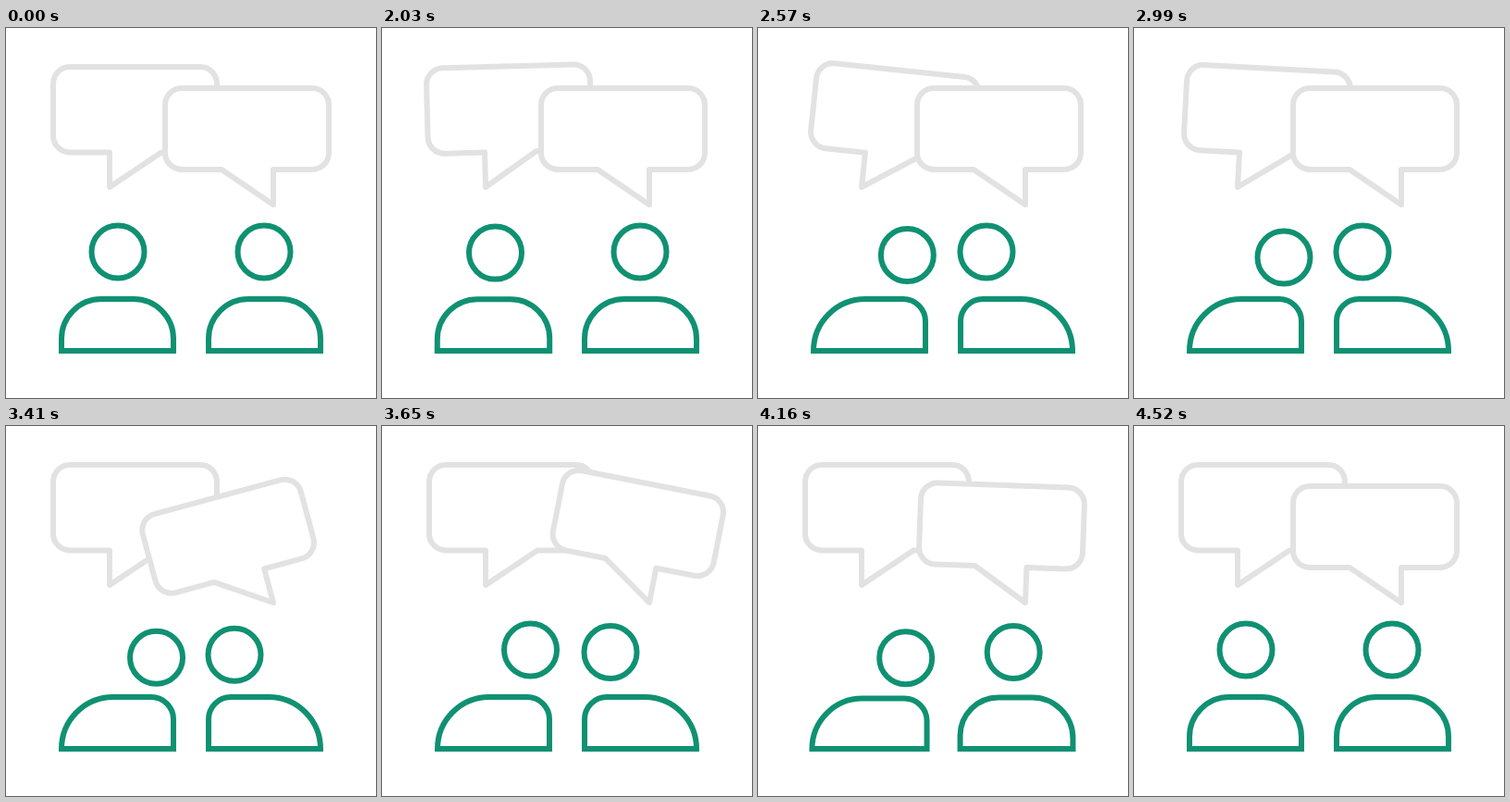
Write an HTML page with a canvas that moves like this. It is 400x400 px and loops after 4.55 s.

```html
<!DOCTYPE html>
<html lang="en">
<head>
<meta charset="utf-8">
<title>Conversation</title>
<style>
  html, body { margin: 0; width: 100%; height: 100%; overflow: hidden; background: #fff; }
  canvas { display: block; width: 400px; height: 400px; }
</style>
</head>
<body>
<canvas id="stage" width="400" height="400"></canvas>
<script>
const ctx = document.getElementById('stage').getContext('2d');
const LOOP = 4550, START = 2030, STEP = 30;
const TURN = 450, NOD = 389, BASE = 349, TOP = 293;
const GREY = '#e2e2e2', GREEN = '#0f9172';

// Damped swing in degrees, as [time, angle] keys
const SWING = [[0, 0], [240, -20.3], [485, 14.3], [720, -8.8], [950, 3.5], [1180, 0]];

const bubbles = [
  { x: 51, y: 42, w: 177, h: 92.5, tip: [112, 172], tailEnd: 168, start: 1990 },
  { x: 172, y: 65, w: 177, h: 88, tip: [289, 191], tailEnd: 233, start: 3110 }
];

const people = [
  { left: 60, right: 181, from: 121, to: 160.5, radii: [56, 24],
    turnIn: 1985, turnOut: 4060, nodAt: 2492, nods: 3, depth: 10, lean: 0.25 },
  { left: 219, right: 340, from: 279, to: 247, radii: [24, 56],
    turnIn: 2085, turnOut: 3780, nodAt: 3320, nods: 1, depth: 12, lean: 0 }
];

const clamp = v => Math.min(1, Math.max(0, v));
const mix = (a, b, p) => a + (b - a) * p;
const smooth = v => { const p = clamp(v); return p * p * (3 - 2 * p); };

function swing(t) {
  for (let i = 1; i < SWING.length; i++) {
    const [t0, a0] = SWING[i - 1], [t1, a1] = SWING[i];
    if (t < t1) return mix(a0, a1, smooth((t - t0) / (t1 - t0)));
  }
  return 0;
}

function drawBubble({ x, y, w, h, tip, tailEnd, start }, t) {
  const r = 18, right = x + w, bottom = y + h;
  const tail = [[tip[0], bottom], tip, [tailEnd, bottom]];
  if (tailEnd > tip[0]) tail.reverse();
  ctx.save();
  ctx.translate(...tip);
  ctx.rotate(swing(t - start) * Math.PI / 180);
  ctx.translate(-tip[0], -tip[1]);
  ctx.beginPath();
  ctx.moveTo(x + r, y);
  ctx.arcTo(right, y, right, bottom, r);
  ctx.arcTo(right, bottom, x, bottom, r);
  tail.forEach(p => ctx.lineTo(...p));
  ctx.arcTo(x, bottom, x, y, r);
  ctx.arcTo(x, y, right, y, r);
  ctx.closePath();
  ctx.fill();
  ctx.stroke();
  ctx.restore();
}

function drawPerson(p, t) {
  const turn = clamp((t - p.turnIn) / TURN) - clamp((t - p.turnOut) / TURN);
  const facing = smooth(turn / 0.85);
  const squash = smooth(turn < 0.6 ? turn / 0.6 : (1 - turn) / 0.4);

  const cycle = (t - p.nodAt) / NOD;
  const nod = cycle > 0 && cycle < p.nods ? p.depth * Math.sin(Math.PI * cycle) ** 2 : 0;
  ctx.beginPath();
  ctx.arc(mix(p.from, p.to, facing) + nod * p.lean, 242 + nod + 15 * squash, 28.5, 0, 2 * Math.PI);
  ctx.stroke();

  const grow = 2.7 * squash;
  const left = p.left - grow, right = p.right + grow, top = TOP + grow;
  const [rl, rr] = p.radii.map(r => Math.min(mix(43, r, facing), BASE - top));
  ctx.beginPath();
  ctx.moveTo(left, BASE);
  ctx.lineTo(left, top + rl);
  ctx.arcTo(left, top, left + rl, top, rl);
  ctx.arcTo(right, top, right, top + rr, rr);
  ctx.lineTo(right, BASE);
  ctx.closePath();
  ctx.stroke();
}

function draw(now) {
  const time = now % LOOP;
  // Rest first, then move in fixed steps
  const t = time < START ? 0 : START + Math.floor((time - START) / STEP) * STEP;
  ctx.fillStyle = '#fff';
  ctx.fillRect(0, 0, 400, 400);
  ctx.lineWidth = 6;
  ctx.lineJoin = 'round';
  ctx.strokeStyle = GREY;
  bubbles.forEach(b => drawBubble(b, t));
  ctx.lineJoin = 'miter';
  ctx.strokeStyle = GREEN;
  people.forEach(p => drawPerson(p, t));
}

let origin;
function tick(now) {
  origin ??= now;
  draw(now - origin);
  requestAnimationFrame(tick);
}
draw(0);
requestAnimationFrame(tick);
</script>
</body>
</html>
```
